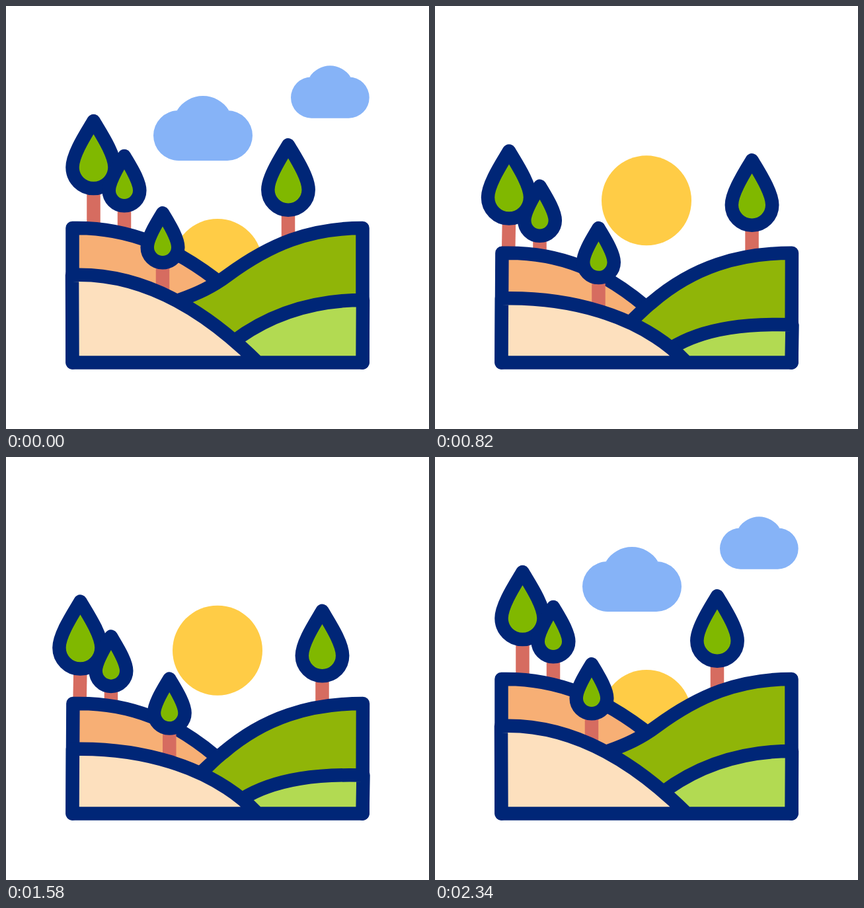
Animation of 640 by 640 pixels, one loop 2.4 s. Source, as an HTML page:

```html
<!DOCTYPE html>
<html lang="en">
<head>
<meta charset="utf-8">
<title>Sunrise over the hills</title>
<style>
  html, body { margin: 0; width: 100%; height: 100%; overflow: hidden; background: #fff; }
  svg { display: block; width: 100vw; height: 100vh; }
</style>
</head>
<body>
<svg id="scene" viewBox="0 0 640 640"></svg>
<script>
const LOOP = 2400;
const NAVY = '#002677';
const LINE = 20.5;
const scene = document.getElementById('scene');

function add(tag, attrs) {
  const el = document.createElementNS('http://www.w3.org/2000/svg', tag);
  for (const key in attrs) el.setAttribute(key, attrs[key]);
  scene.appendChild(el);
  return el;
}

const lerp = (a, b, k) => a + (b - a) * k;
const clamp = x => Math.min(1, Math.max(0, x));
const span = (t, from, to) => clamp((t - from) / (to - from));
const smooth = x => x * x * (3 - 2 * x);

// Symmetric cubic-bezier(a, 0, 1 - a, 1)
function ease(a, x) {
  let lo = 0, hi = 1;
  for (let i = 0; i < 30; i++) {
    const s = (lo + hi) / 2, r = 1 - s;
    if (3 * a * s * r * r + 3 * (1 - a) * s * s * r + s * s * s < x) lo = s;
    else hi = s;
  }
  return smooth(lo);
}

// Blend two path strings that share the same commands
function mix(from, to, k) {
  const ends = to.match(/-?[\d.]+/g);
  let i = 0;
  return from.replace(/-?[\d.]+/g, n => lerp(+n, +ends[i++], k).toFixed(2));
}

function cloud(left, right, top, side, bottom, dome) {
  const r = (bottom - side) / 2, mid = (left + right) / 2, sag = side - top;
  const half = Math.sqrt(dome * dome - (dome - sag) ** 2);
  return add('path', {
    fill: '#86b3f7',
    d: `M${left + r} ${bottom}A${r} ${r} 0 0 1 ${left + r} ${side}H${mid - half}` +
       `A${dome} ${dome} 0 0 1 ${mid + half} ${side}H${right - r}` +
       `A${r} ${r} 0 0 1 ${right - r} ${bottom}Z`
  });
}

function tree(x, y, r, h, dx, dy, base, baseEnd, lean) {
  const trunk = add('line', { stroke: '#d66c60', 'stroke-width': LINE });
  const crown = add('path', {
    fill: '#80b800', stroke: NAVY, 'stroke-width': LINE, 'stroke-linejoin': 'round',
    d: `M0 ${-h}C${-.31 * r} ${-.757 * h} ${-r} ${-.29 * h} ${-r} 0` +
       `A${r} ${r} 0 0 0 ${r} 0C${r} ${-.29 * h} ${.31 * r} ${-.757 * h} 0 ${-h}Z`
  });
  return p => {
    const cx = x + dx * p, cy = y + dy * p;
    crown.setAttribute('transform', `translate(${cx} ${cy})`);
    trunk.setAttribute('x1', cx);
    trunk.setAttribute('y1', cy + r);
    trunk.setAttribute('x2', cx + lean * p);
    trunk.setAttribute('y2', lerp(base, baseEnd, p));
  };
}

// pre and post extend the ridge for the outline, close completes the fill
function hill(color, ridge, ridgeEnd, pre, post, close) {
  const body = add('path', { fill: color });
  const edge = add('path', {
    fill: 'none', stroke: NAVY, 'stroke-width': LINE,
    'stroke-linejoin': 'round', 'stroke-linecap': 'round'
  });
  return p => {
    const d = mix(ridge, ridgeEnd, p);
    body.setAttribute('d', 'M' + d + close);
    edge.setAttribute('d', 'M' + pre + d + post);
  };
}

const cloudA = cloud(223, 373, 136, 158, 234, 46);
const cloudB = cloud(431, 549.7, 90.3, 107.5, 169.7, 36.5);
const sun = add('circle', { cx: 320, r: 68, fill: '#ffcc46' });

const land = [
  tree(132.5, 244, 32, 70, -22.5, 50, 336, 378, -1),
  tree(179, 279, 23.3, 52, -22.5, 50, 342, 381, 0),
  tree(427, 278, 30.7, 67.7, 57.7, 25.3, 355, 381, 0),
  hill('#f7af75',
    '100.5 336C190 334 258 369 315 412',
    '101.5 377.5C190 375 255 405 318 458',
    '100.5 539.5L', '', 'V539.5H100.5Z'),
  tree(237, 365, 23.3, 51.7, 11.5, 25, 435, 463, 0),
  hill('#90b508',
    '262 445C290 435 312 425 336 407C400 360 460 336 539.5 336',
    '296 484C304 476 316 461 328 452C390 398 460 377.5 540 377.5',
    '', 'L539.5 539.5', 'L539.5 539.5H381Z'),
  hill('#b2da52',
    '345 507C400 466 465 445 540 445',
    '358 519C410 487 480 484 540.5 486',
    '', 'L539.5 539.5', 'L539.5 539.5H381Z'),
  hill('#fde0be',
    '100 407C206 403 300 459 381 539.5',
    '101 446C196 444 310 465 381 539.5',
    '100.5 539.5L', 'M100.5 539.5H539.5', 'H100.5Z')
];

// Drift right and fade away, then come back from the left
function moveCloud(el, t, out, back, fadeOut, fadeIn) {
  const leaving = t < 1200;
  const x = leaving
    ? out * smooth(span(t, 0, 600))
    : -back * (1 - smooth(span(t, 1740, 2340)));
  const alpha = leaving
    ? 1 - span(t, fadeOut, fadeOut + 400)
    : span(t, fadeIn, fadeIn + 400);
  el.setAttribute('transform', `translate(${x} 0)`);
  el.setAttribute('opacity', alpha);
}

function draw(t) {
  const p = ease(.795, span(t, 0, 1200)) - ease(.795, span(t, 1200, 2330));
  land.forEach(part => part(p));
  const rise = ease(.78, span(t, 0, 1219)) - ease(.78, span(t, 1235, 2360));
  sun.setAttribute('cy', 390 - 106.5 * rise);
  moveCloud(cloudA, t, 58, 29, 0, 1720);
  moveCloud(cloudB, t, 89, 40, 180, 1820);
}

const start = performance.now();
function tick() {
  draw((performance.now() - start) % LOOP);
  requestAnimationFrame(tick);
}
draw(0);
requestAnimationFrame(tick);
</script>
</body>
</html>
```
